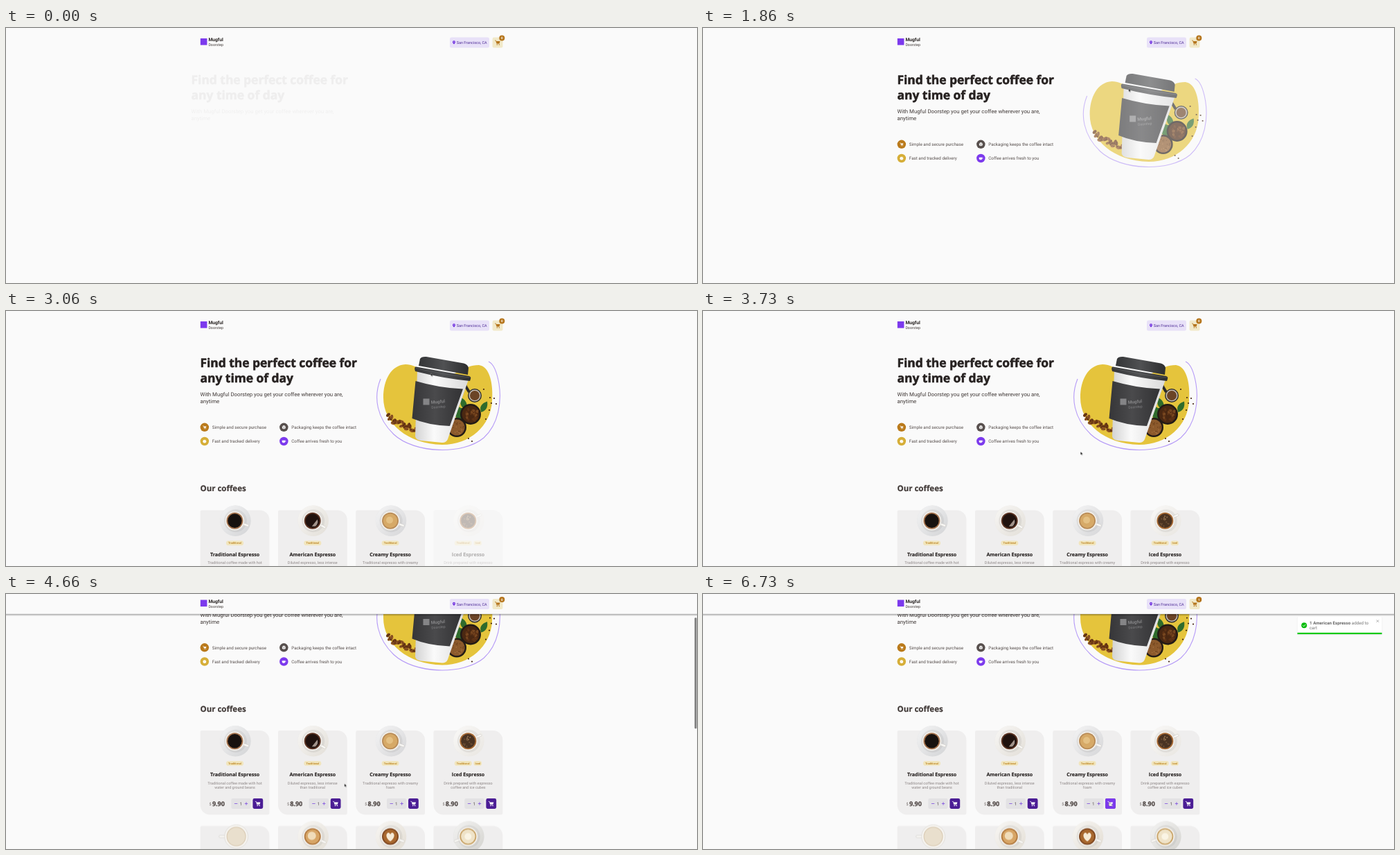
Animation of 998 by 368 pixels, one loop 6.8 s. Source, as an HTML page:

```html
<!DOCTYPE html>
<html lang="en">
<head>
<meta charset="utf-8">
<title>Coffee shop</title>
<style>
/* --t is the loop time in ms; .on elements fade in at --at and out at --off */
@property --t { syntax: "<number>"; inherits: true; initial-value: 0; }
html, body { margin: 0; width: 100%; height: 100%; overflow: hidden; background: #fafafa; }
svg { display: block; width: 998px; height: 368px; animation: clock 6.8s linear infinite; }
text { font-family: Roboto, "Liberation Sans", sans-serif; text-rendering: geometricPrecision; white-space: pre; }
.on {
  --at: 0; --len: 1; --off: 99999;
  opacity: min(calc((var(--t) - var(--at)) / var(--len)), calc((var(--off) - var(--t)) / var(--len)));
}
.round { font-family: "Open Sans", "Noto Sans", sans-serif; font-weight: 700; fill: #272221; stroke: #272221; stroke-width: .3px; stroke-linejoin: round; }
.title { font-size: 17.4px; stroke-width: .55px; }
.sub { font-size: 7.8px; fill: #403937; }
.h2 { font-size: 11.5px; stroke-width: .2px; fill: #403937; stroke: #403937; }
.body { font-size: 6.24px; fill: #574f4d; }
.small { font-size: 5.46px; }
.mid { text-anchor: middle; }
.name { font-size: 7.12px; stroke-width: .12px; }
.desc { fill: #8d8686; }
.tag { font-size: 3.9px; font-weight: 700; fill: #c08a2a; }
.price { font-size: 9px; fill: #574f4d; stroke: #574f4d; }
.sign { stroke: #7b4be0; stroke-width: .8; fill: none; }

.intro { animation: slide 6.8s infinite; }
.hero { animation: enter 6.8s infinite; }
.page { animation: scroll 6.8s infinite; }
.head { animation: dock 6.8s infinite; }
.thumb { animation: thumb 6.8s infinite; }
.toast { animation: toast 6.8s infinite; }
.mouse { animation: mouse 6.8s infinite; }
.spin { animation: spin .8s linear infinite; }

@keyframes clock { from { --t: 0; } to { --t: 6800; } }
@keyframes slide {
  0% { transform: translateX(-13px); animation-timing-function: ease-out; }
  7.5%, 100% { transform: none; }
}
@keyframes enter {
  0%, 22.5% { transform: translateX(40px); animation-timing-function: ease-out; }
  33%, 37% { transform: translateX(-.9px); }
  45%, 100% { transform: none; }
}
@keyframes scroll {
  0%, 55.2% { transform: none; animation-timing-function: ease-in-out; }
  64%, 100% { transform: translateY(-90.5px); }
}
@keyframes dock {
  0%, 55.2% { transform: none; animation-timing-function: ease-out; }
  60%, 100% { transform: translateY(-6.5px); }
}
@keyframes thumb {
  0%, 55.2% { transform: translateY(-33px); animation-timing-function: ease-in-out; }
  64%, 100% { transform: none; }
}
@keyframes toast {
  0%, 89% { transform: translateX(1170px); animation-timing-function: cubic-bezier(.215, .61, .355, 1); }
  95.2% { transform: translateX(-10px); animation-timing-function: cubic-bezier(.215, .61, .355, 1); }
  96.7% { transform: translateX(4px); }
  98% { transform: translateX(-2px); }
  98.9%, 100% { transform: none; }
}
@keyframes mouse {
  0%, 44% { transform: translate(614.8px, 87.5px); animation-timing-function: ease-in-out; }
  54.85% { transform: translate(545.3px, 203px); }
  68.5% { transform: translate(488.8px, 273.5px); }
  72%, 76.5% { transform: translate(475px, 301px); animation-timing-function: ease-in-out; }
  82.35% { transform: translate(528.8px, 293.5px); animation-timing-function: ease-out; }
  86.5%, 100% { transform: translate(587.5px, 300px); }
}
@keyframes spin { to { transform: rotate(360deg); } }
</style>
</head>
<body>
<svg viewBox="0 0 998 368" xmlns="http://www.w3.org/2000/svg">
  <defs>
    <g id="cart">
      <path d="M-3.8-3h1.5L-.9 1.6h3.7" fill="none" stroke="currentColor" stroke-width=".7"/>
      <path d="M-2-2h5.8L2.9 1H-1.1z" fill="currentColor"/>
      <circle cx="-.5" cy="2.9" r=".75" fill="currentColor"/>
      <circle cx="2.5" cy="2.9" r=".75" fill="currentColor"/>
    </g>
    <linearGradient id="paper"><stop stop-color="#d3d3d3"/><stop offset=".35" stop-color="#fafafa"/><stop offset="1" stop-color="#d9d9d9"/></linearGradient>
    <linearGradient id="sleeve"><stop stop-color="#363638"/><stop offset=".45" stop-color="#4a4a4c"/><stop offset="1" stop-color="#323234"/></linearGradient>
    <linearGradient id="lid"><stop stop-color="#343537"/><stop offset=".5" stop-color="#505153"/><stop offset="1" stop-color="#2c2d2f"/></linearGradient>
    <linearGradient id="drop" x2="0" y2="1"><stop stop-opacity=".36"/><stop offset="1" stop-opacity="0"/></linearGradient>
    <linearGradient id="china" x2="1" y2="1"><stop stop-color="#fff" stop-opacity=".75"/><stop offset="1" stop-color="#fff" stop-opacity="0"/></linearGradient>
  </defs>
  <rect width="998" height="368" fill="#fafafa"/>

  <g class="page">
    <g class="on" style="--at:-30;--len:600">
      <g class="intro">
        <text class="round title" x="280.5" y="80.8">Find the perfect coffee for</text>
        <text class="round title" x="280.5" y="103.3">any time of day</text>
        <text class="sub" x="280.5" y="123.2">With Mugful Doorstep you get your coffee wherever you are,</text>
        <text class="sub" x="280.5" y="133.4">anytime</text>
      </g>
    </g>
    <g id="perks"></g>

    <g class="on" style="--at:1540;--len:500">
      <g class="hero">
        <path d="M545 125C545 100 556 78 577 77C596 77 602 92 620 95C650 98 658 78 683 78C699 80 704 106 702 130C700 166 670 193 630 193C580 192 545 162 545 125z" fill="#e5c43c"/>
        <path d="M541 98C530 125 536 155 560 178C590 206 660 208 690 183C712 163 716 130 712 105C709 88 704 76 697 73" fill="none" stroke="#b59af7" stroke-width="1.1"/>
        <g id="extras"></g>
        <path d="M594 86L668 99L638 185Q636 190 630 190L599 187Q592 186 591 181z" fill="url(#paper)"/>
        <path d="M591.5 101Q625 111 660 112.5L641 166Q610 165 586.5 155z" fill="url(#sleeve)"/>
        <path d="M596 79L598 69Q600 65.500 607 66L661 75.500Q667 77 668 82L667 92z" fill="url(#lid)"/>
        <path d="M592 80.500L669 94Q672 95 671 98L670 101Q630 97 591 87Q589 81 592 80.500z" fill="url(#lid)"/>
        <path d="M592 82.500Q630 92 670 96" fill="none" stroke="#67686a" stroke-width=".6"/>
        <rect x="602.5" y="126.500" width="9" height="9" fill="#858587"/>
        <g transform="rotate(-5 614 135)" fill="#858587">
          <text x="614" y="134" font-size="6.400" font-weight="700">Mugful</text>
          <text x="614" y="141" font-size="5">Doorstep</text>
        </g>
      </g>
    </g>

    <text class="round h2 on" style="--at:2220;--len:150" x="280.5" y="260.200">Our coffees</text>
    <g id="cards"></g>
  </g>

  <g class="head">
    <rect y="-10" width="998" height="45.500" fill="#fafafa"/>
    <rect class="on" style="--at:3800;--len:200" y="35.300" width="998" height="3.200" fill="url(#drop)"/>
    <rect x="280.800" y="15" width="9.600" height="9.600" fill="#7c3aed"/>
    <text x="292.400" y="19.400" font-size="6.700" font-weight="700" fill="#272221">Mugful</text>
    <text x="292.400" y="26.400" font-size="5.300" fill="#403937">Doorstep</text>
    <rect x="641" y="13.600" width="57" height="14.900" rx="2.300" fill="#e8e1f8"/>
    <path d="M647 23.500C645.600 22 645 21.200 645 20.300a2 2 0 0 1 4 0C649 21.200 648.400 22 647 23.500z" fill="#6d2be0"/>
    <circle cx="647" cy="20.300" r=".7" fill="#e8e1f8"/>
    <text class="small" x="650.800" y="23" fill="#4b2995">San Francisco, CA</text>
    <rect x="702.600" y="13.600" width="14.900" height="14.900" rx="2.300" fill="#f1e9c9"/>
    <use href="#cart" x="709.800" y="21" color="#b5751c"/>
    <circle cx="716.300" cy="14.500" r="4" fill="#b5751c"/>
    <g class="mid" font-size="4.600" font-weight="700" fill="#fff">
      <text class="on" style="--off:6050" x="716.300" y="16.200">0</text>
      <text class="on" style="--at:6050" x="716.300" y="16.200">1</text>
    </g>
  </g>

  <g class="on" style="--at:3800;--off:5050;--len:120">
    <rect class="thumb" x="994.500" y="34.300" width="3" height="160" rx="1.200" fill="#7e7e7e"/>
  </g>

  <g class="toast">
    <rect x="857.800" y="33" width="123.400" height="26.500" rx="2" fill="#000" opacity=".06"/>
    <rect x="858.500" y="32.800" width="122" height="25.200" rx="1.600" fill="#fff"/>
    <rect x="858.500" y="55.800" width="122" height="2.200" fill="#07c912"/>
    <circle cx="868.200" cy="45.200" r="4" fill="#07bc0c"/>
    <path d="M866.200 45.300l1.500 1.500 2.700-3" fill="none" stroke="#fff" stroke-width=".9"/>
    <text x="876" y="44.100" font-size="6.240" fill="#757575"><tspan font-weight="700" fill="#666">1 American Espresso</tspan> added to</text>
    <text x="876" y="50.700" font-size="6.240" fill="#757575">cart</text>
    <path d="M972.700 37.400l3.400 3.400m0-3.400l-3.400 3.400" stroke="#9a9a9a" stroke-width=".8"/>
  </g>

  <g class="on" style="--at:700">
    <g class="mouse">
      <path class="on" style="--off:4860" d="M0 0v4.600l1.100-1 .8 1.700.8-.4-.8-1.600h1.500z" fill="#111" stroke="#fff" stroke-width=".3"/>
      <path class="on" style="--at:5240;--off:5850" d="M0 0v4.600l1.100-1 .8 1.700.8-.4-.8-1.600h1.500z" fill="#111" stroke="#fff" stroke-width=".3"/>
      <g fill="#fff" stroke="#222" stroke-width=".35">
        <path class="on hand" style="--at:4860;--off:5240"/>
        <path class="on hand" style="--at:5850"/>
      </g>
    </g>
  </g>
</svg>
<script>
const $ = id => document.getElementById(id);
const list = (items, fn) => items.map(fn).join('');
const range = n => [...Array(n).keys()];

let seed = 11;
const rnd = () => (seed = (seed * 16807) % 2147483647) / 2147483647;
const dot = (x, y, r, fill, more = '') => `<circle cx="${x}" cy="${y}" r="${r}" fill="${fill}" ${more}/>`;

document.querySelectorAll('.hand').forEach(p => p.setAttribute('d',
  'M0 0c.6 0 .8.3.8.8v2l1.7.4c.5.1.7.5.6 1l-.4 1.900h-3l-1.500-2.100c-.3-.5.2-.9.7-.6l.4.3v-2.900c0-.5.2-.8.7-.8z'));

// Feature list
const icons = {
  cart: '<use href="#cart" transform="scale(.68)" color="#fff"/>',
  box: '<path d="M0-2.800L2.400-1.500V1.400L0 2.800-2.400 1.400V-1.500z" fill="#fff"/><path d="M-2.300-1.400L0-.1 2.300-1.400M0 0V2.600" fill="none" stroke="#574f4d" stroke-width=".5"/>',
  clock: dot(0, .2, 2.4, '#fff') + '<path d="M0 .2L1.200-1M-.8-2.800H.8" stroke="#d6ae38" stroke-width=".5"/>',
  mug: '<path d="M-2.600-1.300H2V.6a2 2 0 0 1-2 1.700h-.8a2 2 0 0 1-1.800-1.700z" fill="#fff"/><path d="M2-.8h.8v1.300H2" fill="none" stroke="#fff" stroke-width=".5"/>'
};
const perks = [
  ['cart', '#ba7a1b', 'Simple and secure purchase'],
  ['box', '#574f4d', 'Packaging keeps the coffee intact'],
  ['clock', '#d6ae38', 'Fast and tracked delivery'],
  ['mug', '#7c3aed', 'Coffee arrives fresh to you']
];
$('perks').innerHTML = list(perks, ([icon, fill, label], i) => `
  <g class="on" style="--at:${650 + 200 * i};--len:300">
    <g transform="translate(${286.8 + 114.5 * (i % 2)} ${167.8 + 20.2 * (i >> 1)})">
      ${dot(0, 0, 6.25, fill)}${icons[icon]}
      <text class="body" x="11" y="2.200">${label}</text>
    </g>
  </g>`);

// Beans, leaves and bowls around the big cup
const bean = (x, y, s, fill = '#7b4318') => `
  <g transform="translate(${x} ${y}) rotate(${rnd() * 180}) scale(${s})">
    <ellipse rx="3.500" ry="2.300" fill="${fill}"/>
    <path d="M-3 0Q-1-.9 0 0T3 0" fill="none" stroke="#3a1c0a" stroke-width=".7"/>
  </g>`;
const leaf = (x, y, turn) =>
  `<path transform="translate(${x} ${y}) rotate(${turn})" d="M0 0Q8-9 18 0Q8 8 0 0z" fill="#2f6b2c"/>`;
const inDisc = (x, y, r) => {
  const a = rnd() * 6.28, d = r * Math.sqrt(rnd());
  return [x + d * Math.cos(a), y + d * Math.sin(a)];
};
const pile = range(26).map(i => [552 + i * 1.75, 153 + i * .8 + (rnd() - .3) * 10]);
const bits = [[699, 125], [705, 126], [701, 133], [698, 143], [708, 134], [673, 188], [668, 184], [693, 156], [690, 113]];
$('extras').innerHTML =
  leaf(668, 150, 215) + leaf(664, 142, 250) + leaf(652, 156, 280) + leaf(686, 146, 300) + leaf(648, 150, 20) +
  '<path d="M669 117L658 99" stroke="#2a2a2a" stroke-width="4"/>' +
  dot(677, 122, 10, '#33302d') + dot(677, 122, 8.5, '#c4bdb4') + dot(677, 122, 7, '#6b4426') +
  dot(671, 149, 15, '#221a16') + dot(671, 149, 12.5, '#4a2812') +
  list(range(26), () => bean(...inDisc(671, 149, 10.5), .62, rnd() < .5 ? '#8a5528' : '#68391a')) +
  dot(651, 168, 14, '#241b16') + dot(651, 168, 11.5, '#8c5a2c') +
  list(range(30), () => dot(...inDisc(651, 168, 10.5), .8, rnd() < .5 ? '#6a3f1c' : '#a87442')) +
  list(bits, ([x, y]) => dot(x, y, 1.1, '#43230f')) +
  list(pile, ([x, y]) => bean(x, y, .95, rnd() < .4 ? '#a0622a' : '#753f17'));

// Cups seen from above
const cup = ({ plate, rim, drink, turn = 20, art = '', bare }) => `
  ${bare ? '' : dot(1, 0, 22.2, plate) + dot(1, 0, 22.2, 'url(#china)') + dot(1, 0, 16.5, '#000', 'opacity=".06"')}
  <g transform="rotate(${turn})"><rect x="12" y="-1.600" width="${bare ? 13 : 9.5}" height="3.200" rx="1.500" fill="#f8f7f4" stroke="#cbc8c3" stroke-width=".5"/></g>
  ${dot(0, 0, bare ? 17 : 14, '#f5f3ef', 'stroke="#d2cec8" stroke-width=".5"')}
  ${dot(0, 0, bare ? 14 : 12, rim)}${dot(0, 0, bare ? 13 : 10.2, drink)}${art}`;
const swirl = '<path d="M0 7C-6 3-7-3-4-5C-2-6-1-5 0-3C1-5 2-6 4-5C7-3 6 3 0 7z" fill="#f6ead6"/>';
const ice = list(range(14), () => dot(...inDisc(0, 0, 8), 1.1, rnd() < .5 ? '#8a6c4c' : '#6b4d34'));
const cups = [
  { plate: '#d3d4d6', rim: '#a5734e', drink: '#17110e' },
  { plate: '#e3dfd8', rim: '#5d3524', drink: '#20120e', turn: 28, art: '<path d="M-1 8L7-2Q9 4 4 8z" fill="#cdbfb4" opacity=".75"/>' },
  { plate: '#d6d6d8', rim: '#b98c58', drink: '#d6a967', art: dot(-1, -1, 5, '#e4c083') },
  { plate: '#e9e6e1', rim: '#a76a35', drink: '#4a3322', turn: -25, art: ice },
  { bare: true, rim: '#d8c8b0', drink: '#e9dfcd', turn: 180 },
  { plate: '#e4dfd6', rim: '#b27a40', drink: '#d7a566', turn: 25, art: dot(-1, -1, 6, '#f0dcba') },
  { plate: '#e3ddd3', rim: '#7d4620', drink: '#a8682f', turn: 20, art: swirl },
  { plate: '#d4d3cf', rim: '#c9a469', drink: '#efe3c8', turn: 160, art: dot(0, 0, 5, '#faf4e4') }
];

// Product cards
const coffees = [
  ['Traditional Espresso', 'Traditional coffee made with hot', 'water and ground beans', '9.90', ['Traditional']],
  ['American Espresso', 'Diluted espresso, less intense', 'than traditional', '8.90', ['Traditional']],
  ['Creamy Espresso', 'Traditional espresso with creamy', 'foam', '8.90', ['Traditional']],
  ['Iced Espresso', 'Drink prepared with espresso', 'coffee and ice cubes', '8.90', ['Traditional', 'Iced']]
];
const tags = names => {
  const widths = names.map(n => n.length > 5 ? 25 : 11.8);
  let x = 49.9 - (widths.reduce((a, b) => a + b + 2.6)) / 2;
  return list(names, (n, i) => {
    const w = widths[i], left = x;
    x += w + 2.6;
    return `<rect x="${left}" y="44" width="${w}" height="6.800" rx="3.400" fill="#f1e5bd"/>
      <text class="tag mid" x="${left + w / 2}" y="48.800">${n}</text>`;
  });
};
const button = (fill, style = '') =>
  `<rect class="on" style="${style}" x="75.800" y="98.100" width="14.800" height="14.800" rx="2.300" fill="${fill}"/>`;
const whiteCart = (style = '') =>
  `<g class="on" style="${style}"><use href="#cart" x="83" y="105.500" color="#fff"/></g>`;
const spinner = `<g class="on" style="--at:5150;--off:6050"><g transform="translate(83.200 105.500)"><g class="spin">
  ${list(range(8), i => `<path transform="rotate(${45 * i})" d="M0-3.600V-1.900" stroke="#fff" stroke-width=".8" stroke-linecap="round" opacity="${.6 + i * .05}"/>`)}
  </g></g></g>`;
const buyButton = i => button('#4b1d95') + [
  whiteCart(),
  button('#7c3aed', '--at:4860;--off:6050') + whiteCart('--off:5150') + spinner + whiteCart('--at:6050'),
  button('#7c3aed', '--at:5850') + whiteCart(),
  whiteCart()
][i].replace(/^<g class="on" style="">/, '<g>');

const details = ([name, line1, line2, price, labels], i) => `
  ${tags(labels)}
  <text class="round name mid" x="49.900" y="66">${name}</text>
  <text class="small desc mid" x="49.900" y="77.700">${line1}</text>
  <text class="small desc mid" x="49.900" y="84.100">${line2}</text>
  <text class="small" x="13" y="108.400" fill="#6b6361">$</text>
  <text class="round price" x="17.300" y="108.500">${price}</text>
  <rect x="44.700" y="98.100" width="28.300" height="14.800" rx="2.300" fill="#e3e2e4"/>
  <path class="sign" d="M49.300 105.500h4.400M64.200 105.500h4.400M66.400 103.300v4.400"/>
  <text class="body mid" x="58.600" y="107.700">1</text>
  ${buyButton(i)}`;
$('cards').innerHTML = list(range(8), i => {
  const col = i % 4, row = i >> 2;
  return `<g class="on" style="--at:${2240 + 250 * col};--len:220">
    <g transform="translate(${280.6 + 112.32 * col} ${287.5 + 137.7 * row})">
      <path d="M2.300 0H85.800a14 14 0 0 1 14 14V119.300a2.300 2.300 0 0 1-2.300 2.300H14a14 14 0 0 1-14-14V2.300A2.300 2.300 0 0 1 2.300 0z" fill="#efeeee"/>
      <g transform="translate(${i === 4 ? 52 : 49.8} 15.300)">${cup(cups[i])}</g>
      ${row ? '' : details(coffees[col], col)}
    </g>
  </g>`;
});
</script>
</body>
</html>
```
